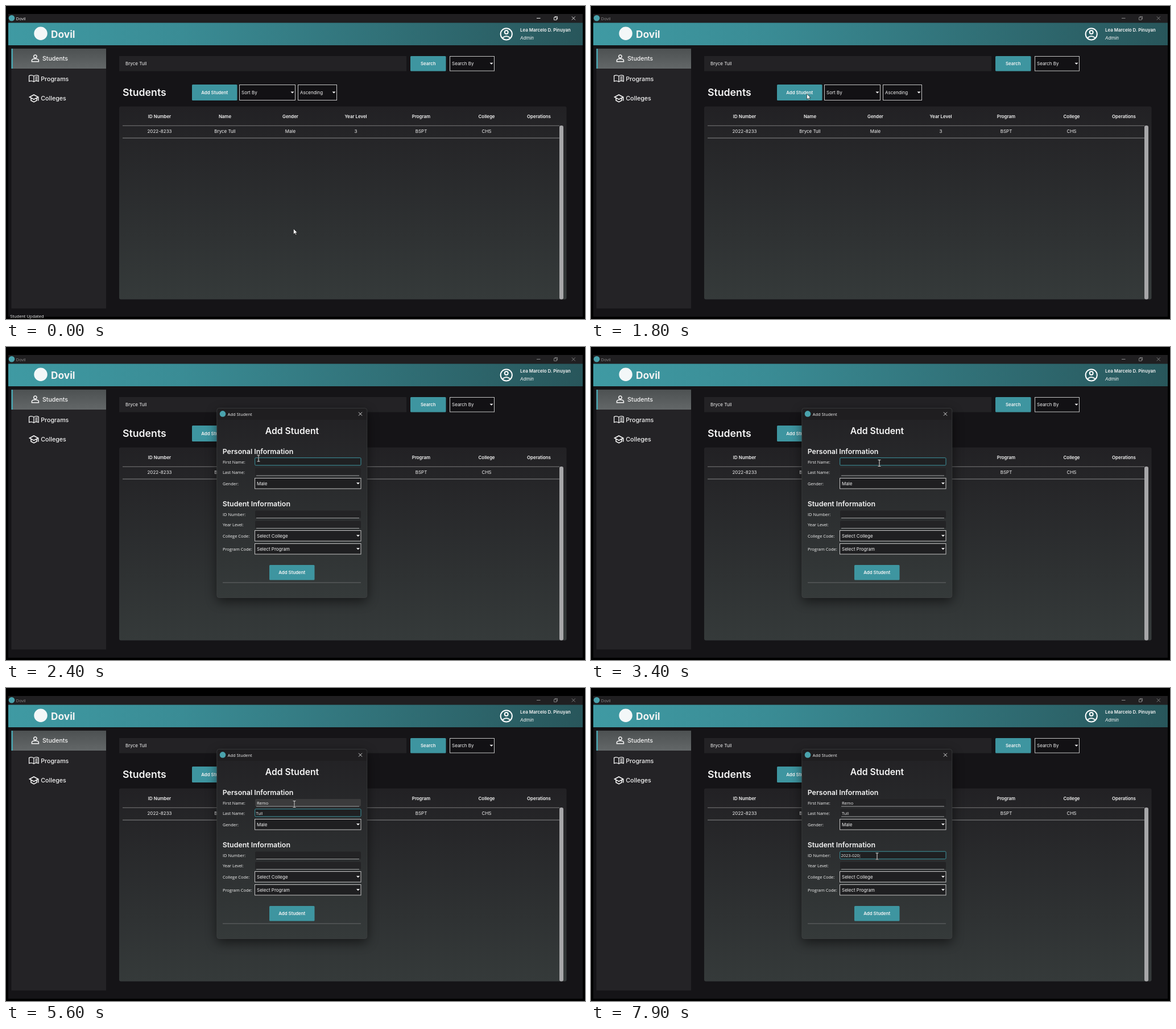
Write an HTML page that moves like this. It is 1018 px wide and 550 px high and loops after 8 s.

```html
<!DOCTYPE html>
<html lang="en">
<head>
<meta charset="utf-8">
<title>Student records</title>
<style>
html, body { margin: 0; width: 100%; height: 100%; overflow: hidden; background: #000; }
svg { display: block; width: 100%; height: 100%; }
text { font-family: Inter, sans-serif; white-space: pre; }
.ui { font-family: "Open Sans", sans-serif; }
</style>
</head>
<body>
<svg id="stage" viewBox="0 0 1018 550" preserveAspectRatio="none">
  <defs>
    <linearGradient id="head" x1="0" y1="0" x2="1" y2="0">
      <stop offset="0" stop-color="#3f9aa3"/><stop offset=".3" stop-color="#3a8c95"/><stop offset="1" stop-color="#28565b"/>
    </linearGradient>
    <linearGradient id="pick" x1="0" y1="0" x2="0" y2="1">
      <stop offset="0" stop-color="#4d5152"/><stop offset="1" stop-color="#636768"/>
    </linearGradient>
    <linearGradient id="panel" x1="0" y1="0" x2="0" y2="1">
      <stop offset="0" stop-color="#222124"/><stop offset="1" stop-color="#353a3a"/>
    </linearGradient>
    <filter id="soft" x="-20%" y="-20%" width="140%" height="140%"><feGaussianBlur stdDeviation="10"/></filter>
  </defs>
</svg>
<script>
const LOOP = 8000, STEP = 100;
const APP = 'Dovil', USER = 'Lea Marcelo D. Pinuyan';
const STUDENT = 'Bryce Tull', FIRST = 'Remo', LAST = 'Tull';
const TEAL = '#3e95a0', WHITE = '#f4f4f4';
const stage = document.getElementById('stage');

// Markup helpers; text y is the middle of the capitals.
const rect = (x, y, w, h, fill, extra = '') =>
  `<rect x="${x}" y="${y}" width="${w}" height="${h}" fill="${fill}" ${extra}/>`;
const text = (x, y, str, size = 8, weight = 400, extra = '') =>
  `<text x="${x}" y="${y + size * .364}" font-size="${size}" font-weight="${weight}" fill="${WHITE}" ${extra}>${str}</text>`;
const mid = 'text-anchor="middle"';
const ui = (x, y, str, extra = '') => text(x, y, str, 7.45, 400, 'class="ui" ' + extra);
const line = (x1, x2, y, color) => `<path d="M${x1} ${y}H${x2}" stroke="${color}" stroke-width="1"/>`;
const dot = (x, y, r, fill) => `<circle cx="${x}" cy="${y}" r="${r}" fill="${fill}"/>`;
const cross = (x, y, r) => `<path d="M${x - r} ${y - r}l${2 * r} ${2 * r}m0 ${-2 * r}l${-2 * r} ${2 * r}" fill="none" stroke="#f0f0f0" stroke-width=".9"/>`;
const icon = (x, y, d, w = 1.6) =>
  `<path transform="translate(${x} ${y})" d="${d}" fill="none" stroke="${WHITE}" stroke-width="${w}"/>`;

function button(x, y, w, h, label) {
  return rect(x, y, w, h, TEAL, 'rx="1.5"') + text(x + w / 2, y + h / 2, label, 7.85, 600, mid);
}
function combo(x, y, w, h, label, fill) {
  const ax = x + w - 8.5, ay = y + h / 2 - 1.6;
  return rect(x + .5, y + .5, w - 1, h - 1, fill, 'stroke="#c4c4c4"') +
    text(x + 4, y + h / 2, label) +
    `<path d="M${ax} ${ay}h6l-3 3z" fill="#fff"/>`;
}

function windowView() {
  const cols = [270, 385, 500, 615, 730, 845, 937];
  const heads = ['ID Number', 'Name', 'Gender', 'Year Level', 'Program', 'College', 'Operations'];
  const row = ['2022-8233', STUDENT, 'Male', '3', 'BSPT', 'CHS'];
  return rect(4, 14, 1010, 532, '#151417') + rect(4, 14, 1010, 15.5, '#201f21') +
    dot(10, 21.3, 5.3, '#4aa3ad') +
    `<g id="caption">${ui(17.5, 21.8, APP)}` +
      line(933, 939.5, 21.5, '#f0f0f0') +
      '<path d="M963.5 20h4.5v4.5h-4.5zM965 20v-1.5h4.5v4.5h-1.5" fill="none" stroke="#f0f0f0" stroke-width=".9"/>' +
      cross(997.8, 21.5, 3) + '</g>' +
    rect(4, 29.5, 1010, 39.5, 'url(#head)') + dot(61, 48.3, 11.7, '#f3f7f8') +
    text(79, 49.8, APP, 17.3, 700) +
    `<circle cx="879.7" cy="49.3" r="10.1" fill="none" stroke="#fff" stroke-width="2"/>
     <circle cx="879.7" cy="46" r="3" fill="none" stroke="#fff" stroke-width="2"/>` +
    icon(879.7, 49.3, 'M-7 7Q0 .4 7 7', 2) +
    text(904, 42.6, USER, 7.88, 600) + text(904, 56, 'Admin', 8, 400, 'font-style="italic"') +
    rect(9.5, 74.5, 166.5, 457, '#242326') + rect(9.5, 75, 166.5, 35, 'url(#pick)') + rect(9.5, 75, 2.5, 35, '#4aa6b1') +
    icon(51.4, 92, 'M0 -6a2.7 2.7 0 1 1 0 5.4a2.7 2.7 0 1 1 0 -5.4zM-6 5.7v-2c0 -4 12 -4 12 0v2z') +
    icon(48.9, 127.5, 'M0 -4.3C-2.5 -6 -6 -6 -8.3 -4.8V5C-6 4 -2.5 4 0 5.6C2.5 4 6 4 8.3 5V-4.8C6 -6 2.5 -6 0 -4.3V5.6M2.5 -2.3q2 -.8 4 -.5M2.5 .2q2 -.8 4 -.5M2.5 2.7q2 -.8 4 -.5', 1.3) +
    icon(49, 162, 'M-7.5 -2L0 -6L7.5 -2L0 2.2zM-5 -.5V4L0 6.7L5 4V-.5M7.7 -2V4.5') +
    text(64, 92.6, 'Students', 10.55, 500) + text(61.3, 128, 'Programs', 10.65, 500) + text(61.3, 162.6, 'Colleges', 10.65, 500) +
    rect(199, 88, 505, 26.5, '#232225') + text(210, 101.3, STUDENT) +
    button(711, 88, 62.5, 26.5, 'Search') + combo(780, 88, 79, 26.5, 'Search By', '#121114') +
    text(205, 152, 'Students', 17.7, 600) +
    button(327, 138, 79.5, 28, 'Add Student') +
    combo(410, 138, 99, 28, 'Sort By', '#121114') + combo(513, 138, 69, 28, 'Ascending', '#121114') +
    rect(199, 176.5, 786.5, 339, 'url(#panel)', 'rx="3"') +
    heads.map((h, i) => text(cols[i], 193.7, h, 7.85, 600, mid)).join('') +
    line(205, 973, 210.3, '#78797a') +
    row.map((c, i) => text(cols[i], 220, c, 8, 400, mid)).join('') +
    line(205, 973, 232, '#88898a') +
    rect(973, 210, 7, 305.5, '#a7a7a9', 'rx="3"') +
    `<g id="status">${ui(7.3, 545, 'Student Updated')}</g>`;
}

const fields = [
  { label: 'First Name:', y: 195, str: FIRST, focus: 1800, blur: 4500, keys: [3700, 3900, 4000, 4200] },
  { label: 'Last Name:', y: 213, str: LAST, focus: 4500, blur: 6600, keys: [4700, 4800, 4900, 5000] },
  { label: 'ID Number:', y: 287.5, str: '2023-020', focus: 6600, blur: LOOP,
    keys: [7000, 7100, 7200, 7300, 7500, 7600, 7700, 7800] },
  { label: 'Year Level:', y: 305.5, str: '', focus: LOOP, blur: LOOP, keys: [] }
];

function dialogView() {
  const select = (y, label, value) => ui(381, y + 10, label) + combo(437, y, 187.5, 19.5, value, '#1f1f21');
  return rect(371, 114, 264, 333, '#000', 'rx="6" opacity=".55" filter="url(#soft)"') +
    rect(370.8, 107.5, 264, 333, 'url(#panel)', 'rx="4"') +
    '<path d="M371 128V111.5q0 -4 4 -4H630.800q4 0 4 4V128z" fill="#1f1e20"/>' +
    rect(370.8, 107.5, 264, 333, 'none', 'rx="4" stroke="#434446" stroke-width=".7"') +
    dot(381, 117.4, 5.3, '#4aa3ad') + ui(389.7, 118, 'Add Student') + cross(623, 117.6, 3) +
    text(503, 147, 'Add Student', 15.7, 600, mid) +
    text(380.7, 183.2, 'Personal Information', 12.4, 600) +
    text(380.7, 275.2, 'Student Information', 12.4, 600) +
    fields.map(f => ui(381, f.y + 7, f.label)).join('') + '<g id="inputs"></g>' +
    select(230, 'Gender:', 'Male') + select(322, 'College Code:', 'Select College') +
    select(345, 'Program Code:', 'Select Program') +
    button(463, 383, 79.5, 26.5, 'Add Student') + line(381, 624, 414, '#66696a');
}

const pointers = {
  arrow: '<path d="M0 0V9.600L2.300 7.500L3.800 10.800L5.300 10.100L3.800 6.900H6.800z" fill="#fff" stroke="#111" stroke-width=".6"/>',
  hand: '<path d="M-1 .8q1 -1.500 2 0v3.700l4 .9q1 .4 .9 1.600l-.9 4.500h-5l-3.500 -4.500q.4 -1.500 1.600 -.4l.9 .8z" fill="#fff" stroke="#111" stroke-width=".5"/>',
  beam: '<path d="M-2.500 -5.500H2.500M0 -5.500V5.500M-2.500 5.500H2.500" fill="none" stroke="#111" stroke-width="2"/>' +
    '<path d="M-2.500 -5.500H2.500M0 -5.500V5.500M-2.500 5.500H2.500" fill="none" stroke="#e4e4e4" stroke-width="1.100"/>'
};

stage.insertAdjacentHTML('beforeend', windowView() + `<g id="dialog">${dialogView()}</g>` +
  Object.keys(pointers).map(k => `<g id="${k}">${pointers[k]}</g>`).join(''));
const el = id => document.getElementById(id);

// Pointer stops: time, x, y
const path = [
  [0, 505.5, 391.5], [500, 505.5, 391.5], [1100, 386, 166], [1300, 379.5, 154.5],
  [1900, 379.5, 154.5], [2400, 444, 195.5], [2800, 507, 204], [6000, 507, 204], [6450, 503, 295.5], [LOOP, 503, 295.5]
];
function pointerAt(t) {
  const i = path.findIndex(p => p[0] > t), a = path[i - 1], b = path[i];
  const u = (t - a[0]) / (b[0] - a[0]), k = u * u * (3 - 2 * u);
  return [a[1] + (b[1] - a[1]) * k, a[2] + (b[2] - a[2]) * k];
}
const over = (x, y, f) => x > 437 && x < 625 && y >= f.y && y < f.y + 13.5;

function pointerKind(t, x, y) {
  if (t >= 1900) return fields.some(f => over(x, y, f)) ? 'beam' : 'arrow';
  return t < 1700 && x > 327 && x < 407 && y >= 138 && y <= 167 ? 'hand' : 'arrow';
}

function input(f, t, x, y) {
  const focused = t >= f.focus && t < f.blur;
  const typed = f.keys.filter(k => k <= t);
  const str = f.str.slice(0, typed.length);
  if (!focused) {
    const fill = over(x, y, f) ? '#3b3b3c' : '#232325';
    return rect(438, f.y, 186, 13, fill, 'rx="2"') + line(440, 621, f.y + 13, '#a0a1a2') + ui(441, f.y + 7, str);
  }
  const since = t - (typed.length ? typed[typed.length - 1] : f.focus);
  const caret = since % 1060 < 530 ? '<tspan font-size="8" font-weight="300" dx="-1">|</tspan>' : '';
  return rect(437.7, f.y - .3, 186.3, 13.2, '#1f2022', 'rx="1.5" stroke="#3e95a0" stroke-width="1"') +
    ui(439.5, f.y + 7, str + caret);
}

function draw(t) {
  const [x, y] = pointerAt(t), kind = pointerKind(t, x, y);
  el('caption').setAttribute('opacity', t < 1700 ? 1 : .5);
  el('status').setAttribute('opacity', t < 1700 ? 1 : 0);
  const open = Math.min(1, Math.max(0, (t - 1800) / 200)), s = .94 + .06 * open;
  el('dialog').setAttribute('opacity', open);
  el('dialog').setAttribute('transform', `translate(503 274) scale(${s}) translate(-503 -274)`);
  el('inputs').innerHTML = fields.map(f => input(f, t, x, y)).join('');
  for (const k in pointers) {
    el(k).setAttribute('transform', `translate(${x} ${y})`);
    el(k).setAttribute('visibility', k === kind ? 'visible' : 'hidden');
  }
}

const start = performance.now();
function tick() {
  const t = (performance.now() - start) % LOOP;
  draw(Math.floor(t / STEP) * STEP);
  requestAnimationFrame(tick);
}
tick();
</script>
</body>
</html>
```
